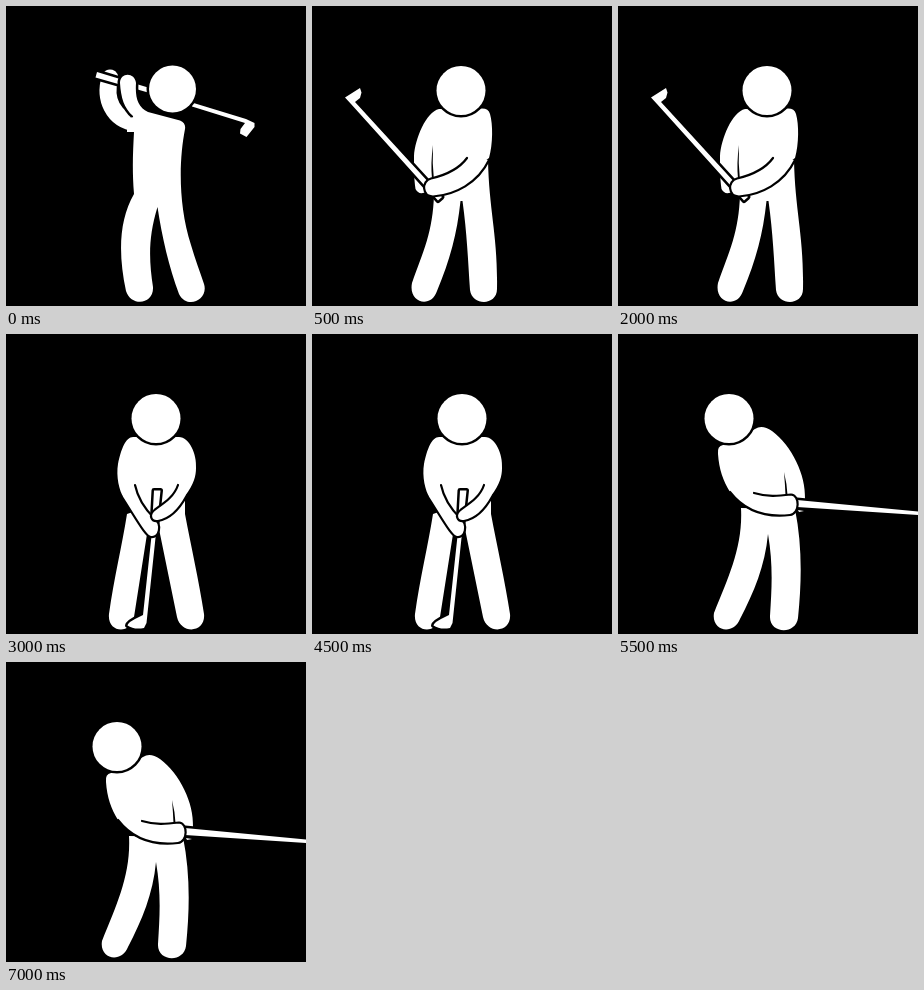
Recreate the animation shown at these times as an HTML page. Size 300x300 px, loop 8000 ms.

```html
<!DOCTYPE html>
<html lang="en">
<head>
<meta charset="utf-8">
<title>Golf swing</title>
<style>
  html, body { margin: 0; height: 100%; overflow: hidden; background: #000; }
  svg { display: block; width: 100vw; height: 100vh; }
  /* White parts carry a black outline outside their fill. */
  path, circle { fill: #fff; stroke: #000; stroke-width: 5; stroke-linejoin: round; paint-order: stroke; }
  /* Arms are open paths: the open side blends into the torso. */
  .arm { stroke-width: 2.2; stroke-linecap: round; paint-order: normal; }
  .limb { fill: none; stroke: #fff; stroke-width: 17; stroke-linecap: round; }
  .join { stroke: none; }
  .crease { fill: #000; stroke: none; }
  .pose { display: none; }
  .pose.on { display: inline; }
</style>
</head>
<body>
<svg viewBox="0 0 300 300">
  <!-- backswing -->
  <g class="pose">
    <path class="limb" d="M104 72C98 92 106 114 131 117.500"/>
    <path d="M91 66L142 81.500V86.500L89.500 71.500Z"/>
    <path d="M186 96.500L240 113L248.500 117V121L240.500 131L234 127.500L234.500 123L239 117L186 100.500Z"/>
    <path d="M114 77C114 66 129 66 130 77C129 92 132 101 142 106L174 114.500Q180 117 179 123C173 154 172 198 185 239C189 253 194 266 198 278C203 294 181 304 173 288C163 261 156 231 151.500 201C142 232 143 254 147 281C148 299 125 301 120 285C112 248 113 214 128 188C126 163 127 146 128 126L127 110C118 102 115 92 114 77Z"/>
    <path class="join" d="M121 112L136 110V126H121Z"/>
    <circle cx="166.500" cy="83" r="23.500"/>
  </g>

  <!-- follow-through -->
  <g class="pose">
    <path d="M122 188C121 226 111 246 100 277C96 297 119 303 125 285C138 254 145 228 148.500 195H150.500C155 228 156 254 158 284C160 300 185 300 185 283C186 230 177 205 176 154Z"/>
    <path d="M127 103C114 106 103 133 102 150C102 165 102 172 103.500 183Q106 188 111 187L122 184L150 172L177 152C181 138 181 118 178 108Q176 101 166 103Z"/>
    <path class="crease" d="M121 139Q118.500 157 120 173L122 175Q120 157 121 139Z"/>
    <path d="M33 91.500L48 82L49.500 86.500L48 92L43 96L130 191L126 194.500L39 98Z"/>
    <path class="arm" d="M155 152C147 163 134 169 119 172.500C109 175 110 190.500 121 190.500C143 189 166 177 177 154"/>
    <circle cx="149" cy="84.500" r="24.500"/>
  </g>

  <!-- address -->
  <g class="pose">
    <path d="M121 180C116 212 108 244 103 280C101 299 125 301 128 283L141 200L153 195L171 283C175 301 200 299 198 280C193 247 185 212 179 180V160Z"/>
    <path d="M128 103C120 102 115 115 112 130C110 142 113 157 118 164L140 190L160 180L179 162C188 150 190 142 190 134C191 120 183 102 172 103Z"/>
    <path d="M148 156.500H154.500L140.500 289L138 294Q128 296 121.500 291.500Q122 288 133 283L137 281L145.500 202Z"/>
    <path class="arm" d="M129 151C132 165 139 175 148 184C157 191 153 204 145 203C140 203 132 188 116 163"/>
    <path class="arm" d="M172 151C168 163 158 169 149 175.500C142 181 145 188 152 187C164 185 174 174 180.500 162"/>
    <circle cx="150" cy="84.500" r="24.500"/>
  </g>

  <!-- impact -->
  <g class="pose">
    <path d="M123 174C125 212 111 242 96 279C93 297 115 302 122 285C136 258 147 232 150 200C155 229 154 252 152 282C151 300 178 301 180 284C184 245 184 210 177 175Z"/>
    <path d="M105 111Q99 112 100 120C101 135 105 147 112 158L130 172L170 174L187 165C188 141 174 112 154 97Q144 90 137 95Z"/>
    <path class="crease" d="M166 138Q167 150 167.500 161H169.500Q169 150 166 138Z"/>
    <path d="M179 166L300 177.500V181L179 173Z"/>
    <path class="join" d="M180 176L186 177L181 178Z"/>
    <path class="arm" d="M136 159C149 163 160 162 173 160.500C182 161 182 180 172 181C146 184 126 176 112 158"/>
    <circle cx="111" cy="84.500" r="24.500"/>
  </g>
</svg>
<script>
  const poses = [...document.querySelectorAll('.pose')];
  const starts = [0, 500, 3000, 5500];
  const loop = 8000;

  function draw() {
    const t = performance.now() % loop;
    const current = starts.filter(s => s <= t).length - 1;
    poses.forEach((pose, i) => pose.classList.toggle('on', i === current));
    requestAnimationFrame(draw);
  }
  draw();
</script>
</body>
</html>
```
